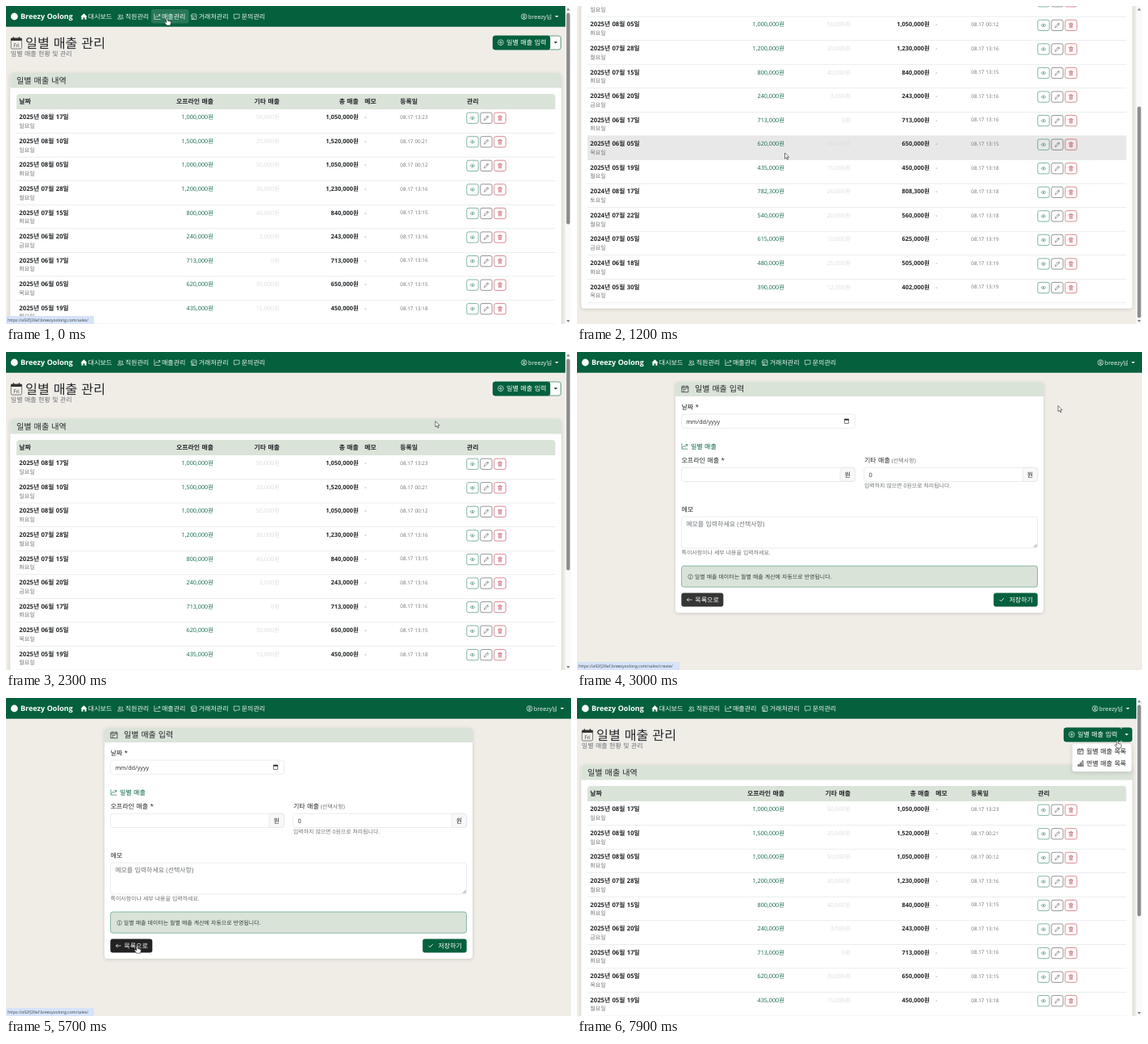
Write an HTML page that moves like this. It is 700x394 px and loops after 8 s.

```html
<!DOCTYPE html>
<html lang="ko">
<head>
<meta charset="utf-8">
<title>일별 매출 관리</title>
<style>
html, body { margin: 0; width: 100%; height: 100%; overflow: hidden; background: #f0ede7; }
svg { display: block; width: 700px; height: 394px; }
text {
  font-family: "Open Sans", "Noto Sans CJK KR", "Noto Sans CJK", sans-serif;
  word-spacing: .04em; white-space: pre; text-rendering: geometricPrecision;
}
.card { filter: drop-shadow(0 1px 2px rgba(0,0,0,.14)); }
</style>
</head>
<body>
<svg id="stage" viewBox="0 0 700 394" xmlns="http://www.w3.org/2000/svg"></svg>
<script>
const GREEN = '#04603d', SAGE = '#dae3d8', INK = '#25282b', GRAY = '#6f7377', LINE = '#dee1e3';
const LOOP = 8000, STEP = 100, MAX_SCROLL = 174;
const ROW_TOP = 128, ROW_H = 29.56;
const HOST = 'https://a92fj39af.breezyoolong.com/sales/';

// Markup helpers
const text = (s, x, y, size = 8, fill = INK, more = '') =>
  `<text x="${x}" y="${y}" font-size="${size}" fill="${fill}" ${more}>${s}</text>`;
const box = (x, y, w, h, fill, r = 0, more = '') =>
  `<rect x="${x}" y="${y}" width="${w}" height="${h}" rx="${r}" fill="${fill}" ${more}/>`;
const outline = (x, y, w, h, color, fill = '#fff', r = 3) =>
  box(x, y, w, h, fill, r, `stroke="${color}" stroke-width=".6"`);
const group = (id, body, more = '') => `<g id="${id}" ${more}>${body}</g>`;
const END = 'text-anchor="end"', BOLD = 'font-weight="700"', SEMI = 'font-weight="600"';

// Line icons on a 16 unit grid
const ICONS = {
  people: 'M5.5 8a2.5 2.5 0 1 0 0-5a2.5 2.5 0 0 0 0 5M1 13.5c0-5 9-5 9 0zM11 8a2.3 2.3 0 1 0-.5-4.500M11.500 9.700c2.500 0 3.500 2 3.500 3.800h-3',
  graph: 'M1 1v14h15M3 11l4-5 3 3 5-6M11 3h4v4',
  shop: 'M2 7v8h12v-8M1 6l2-4.500h10l2 4.500q-1.700 3-3.500 0q-1.700 3-3.500 0q-1.700 3-3.500 0q-1.800 3-3.500 0zM4 15v-4h4v4',
  chat: 'M1.500 2h13v10h-8l-3 3v-3h-2z',
  person: 'M8 15a7 7 0 1 0 0-14a7 7 0 0 0 0 14M8 9a2.500 2.500 0 1 0 0-5a2.500 2.500 0 0 0 0 5M3.500 13c1-3.500 8-3.500 9 0',
  plus: 'M8 15a7 7 0 1 0 0-14a7 7 0 0 0 0 14M8 4.500v7M4.500 8h7',
  info: 'M8 15a7 7 0 1 0 0-14a7 7 0 0 0 0 14M8 7v5M8 4v1.500',
  eye: 'M1 8q7-9 14 0q-7 9-14 0M8 10a2 2 0 1 0 0-4a2 2 0 0 0 0 4',
  pencil: 'M2 14l1-4 9-9 3 3-9 9zM10 3l3 3',
  trash: 'M2 3.500h12M6 3v-2h4v2M3.500 4l.5 11h8l.5-11M6.500 6.500v6M9.500 6.500v6',
  calendar: 'M1.500 2.500h13v12h-13zM1.500 5.500h13M4.500 1v2M11.500 1v2M4 9h2M7.500 9h2M4 12h2',
  bars: 'M1 15h14M2 15v-4h2.500v4M7 15v-8h2.500v8M12 15v-13h2.500v13',
  back: 'M15 8h-13M6.500 3.500l-4.500 4.500 4.500 4.500',
  check: 'M2 8.500l4 4 8-9'
};
const icon = (name, x, y, size, color, weight = 1.3) =>
  `<path d="${ICONS[name]}" transform="translate(${x} ${y}) scale(${size / 16})" fill="none" stroke="${color}" stroke-width="${weight}" stroke-linejoin="round" stroke-linecap="round"/>`;
const caret = (x, y, fill, id = '') =>
  `<path ${id && `id="${id}"`} d="M${x - 2.3} ${y - 1.100}h4.600l-2.300 2.400z" fill="${fill}"/>`;

function nav(width, shift) {
  const items = [['people', 138, '직원관리'], ['graph', 183.3, '매출관리'], ['shop', 229, '거래처관리'], ['chat', 282, '문의관리']];
  return box(0, 0, width, 25.7, GREEN) +
    '<circle cx="10.300" cy="13" r="4.400" fill="#fff"/>' +
    text('Breezy Oolong', 18, 16.4, 9, '#fff', BOLD) +
    '<path d="M92.500 13.200l4-4 4 4h-1v3.500h-2v-2.500h-2v2.500h-2v-3.500z" fill="#fff"/>' +
    text('대시보드', 101.8, 15.8, 8, '#f2f7f4') +
    items.map(([name, x, label]) => icon(name, x, 9.2, 7.8, '#f2f7f4') + text(label, x + 9.7, 15.8, 8, '#f2f7f4')).join('') +
    icon('person', 637.9 + shift, 9.200, 7.800, '#fff') +
    text('breezy님', 647 + shift, 15.8, 7.3, '#f2f7f4') + caret(682.3 + shift, 13, '#fff');
}

// date, offline amount, other amount, registered
const SALES = [
  ['2025-08-17', 1000000, 50000, '08.17 13:23'], ['2025-08-10', 1500000, 20000, '08.17 00:21'],
  ['2025-08-05', 1000000, 50000, '08.17 00:12'], ['2025-07-28', 1200000, 30000, '08.17 13:16'],
  ['2025-07-15', 800000, 40000, '08.17 13:15'], ['2025-06-20', 240000, 3000, '08.17 13:16'],
  ['2025-06-17', 713000, 0, '08.17 13:16'], ['2025-06-05', 620000, 30000, '08.17 13:15'],
  ['2025-05-19', 435000, 15000, '08.17 13:18'], ['2024-08-17', 782300, 26000, '08.17 13:18'],
  ['2024-07-22', 540000, 20000, '08.17 13:18'], ['2024-07-05', 615000, 10000, '08.17 13:19'],
  ['2024-06-18', 480000, 25000, '08.17 13:19'], ['2024-05-30', 390000, 12000, '08.17 13:19']
];
const won = n => String(n).replace(/\B(?=(\d{3})+$)/g, ',') + '원';

function saleRow([date, offline, other, stamp], i) {
  const top = ROW_TOP + i * ROW_H, y = top + 12.3;
  const [year, month, day] = date.split('-');
  const weekday = '일월화수목금토'[new Date(Date.UTC(year, month - 1, day)).getUTCDay()];
  const tools = [['eye', 570.8, '#2e8562'], ['pencil', 587.8, '#4a4d50'], ['trash', 604.8, '#c23a4a']];
  return text(`${year}년 ${month}월 ${day}일`, 16.3, y, 7.75, INK, BOLD) +
    text(weekday + '요일', 16.3, top + 23, 7, GRAY) +
    text(won(offline), 257, y, 7.3, '#14694a', END) +
    text(won(other), 339, y, 7.3, '#dcdddc', END) +
    text(won(offline + other), 436.8, y, 7.4, INK, BOLD + ' ' + END) +
    text('-', 444.3, y, 7.3, GRAY) +
    text(stamp, 488.3, y - .2, 6.35, GRAY) +
    tools.map(([name, x, color]) => outline(x, top + 4.1, 14.4, 13.3, color, 'none', 2.2) +
      icon(name, x + 3.9, top + 7.5, 6.6, color)).join('') +
    box(13, top + ROW_H - .3, 667.5, .6, LINE);
}

function listPage() {
  const heads = [['날짜', 16.3], ['오프라인 매출', 257, END], ['기타 매출', 339, END], ['총 매출', 436.8, END],
    ['메모', 444.3], ['등록일', 488.3], ['관리', 571]];
  const bottom = ROW_TOP + SALES.length * ROW_H + 7;
  return nav(693, 0) +
    box(180, 4, 46.500, 17.500, '#fff', 3, 'id="navHover" opacity=".14"') +
    outline(6.2, 40, 13.300, 13, '#333', 'none', 1.500) + box(6, 39.800, 13.700, 3.200, '#333', 1) +
    box(8.700, 38.300, 1.300, 3, '#333') + box(15.700, 38.300, 1.300, 3, '#333') +
    text('Fri', 12.9, 50.9, 6.3, '#333', 'text-anchor="middle"') +
    text('일별 매출 관리', 24, 51.6, 16.2, INK) +
    text('일별 매출 현황 및 관리', 5.8, 62.4, 8, GRAY) +
    outline(603.3, 37, 84.200, 17, GREEN) +
    box(603, 36.7, 71.3, 17.600, GREEN, 3, 'id="addButton"') +
    box(674, 36.7, 13.800, 17.600, GREEN, 3, 'id="toggle"') +
    icon('plus', 609, 41.300, 7.800, '#fff') + text('일별 매출 입력', 620, 48.2, 8.1, '#fff') +
    caret(681, 45.300, INK, 'toggleCaret') +
    group('', box(5.3, 83, 682.7, bottom - 83, '#fff', 4) +
      `<path d="M5.300 101.500v-14.500a4 4 0 0 1 4-4h674.700a4 4 0 0 1 4 4v14.500z" fill="${SAGE}"/>`, 'class="card"') +
    text('일별 매출 내역', 13, 95.6, 10.1, INK) +
    `<path d="M13 128v-15a4 4 0 0 1 4-4h659.500a4 4 0 0 1 4 4v15z" fill="${SAGE}"/>` +
    heads.map(([s, x, more = '']) => text(s, x, 121, 7.9, INK, SEMI + ' ' + more)).join('') +
    box(13, 0, 667.5, ROW_H, '#000', 0, 'id="rowHover" opacity=".09"') +
    SALES.map(saleRow).join('') +
    group('menu', group('', outline(613.3, 56.300, 74, 35, '#d8d8d8'), 'class="card"') +
      icon('calendar', 620, 62.300, 7.800, INK) + text('월별 매출 목록', 631, 69, 8.1) +
      icon('bars', 620, 76.800, 7.800, INK) + text('연별 매출 목록', 631, 83.5, 8.1));
}

function scrollbar() {
  return box(693, 0, 7, 394, '#fafafa') +
    '<path d="M694.300 5.500l2.200-3 2.200 3zM694.300 389l2.200 3 2.200-3z" fill="#858585"/>' +
    box(694.3, 8.500, 4.400, 262, '#8b8b8b', 2.2, 'id="thumb"');
}

function formPage() {
  const amount = (x, value) => outline(x, 143.2, 215, 17.300, LINE) +
    outline(x + 196.500, 143.2, 18.500, 17.300, LINE, '#f7f8f7') +
    text('원', x + 202, 154.7, 8) + text(value, x + 5.7, 154.7, 7.4);
  return box(0, 0, 700, 394, '#f0ede7') + nav(700, 6.8) +
    group('', box(122, 37, 456, 286, '#fff', 4) +
      `<path d="M122 55v-14a4 4 0 0 1 4-4h448a4 4 0 0 1 4 4v14z" fill="${SAGE}"/>`, 'class="card"') +
    icon('calendar', 129.3, 41.200, 9.400, INK, 1.2) + text('일별 매출 입력', 146, 49.4, 10, INK) +
    text('날짜 *', 129.5, 70.7) +
    outline(129.5, 77, 215, 17.300, LINE) + text('mm/dd/yyyy', 135.2, 88.6, 7.2) +
    outline(331.400, 83.300, 5.200, 5.200, '#222', '#fff', .5) + box(331.200, 82.800, 5.600, 1.800, '#222') +
    icon('graph', 129.5, 113.2, 7.4, GREEN) + text('일별 매출', 141, 119.9, 8, GREEN) +
    text('오프라인 매출 *', 129.5, 136.7) + amount(129.5, '') +
    text('기타 매출', 356, 136.7) + text('(선택사항)', 389.8, 136.5, 7, GRAY) + amount(355.7, '0') +
    text('입력하지 않으면 0원으로 처리됩니다.', 356, 168.4, 6.9, GRAY) +
    text('메모', 129.5, 197.6) +
    outline(129.5, 204.200, 441, 38.800, LINE) + text('메모를 입력하세요 (선택사항)', 135.2, 215.5, 7.95, GRAY) +
    '<path d="M565.800 242l4-4M568 242l1.800-1.800" stroke="#555" stroke-width=".6"/>' +
    text('특이사항이나 세부 내용을 입력하세요.', 129.5, 251.2, 6.95, GRAY) +
    outline(129.5, 265, 441, 26.200, '#4a9674', SAGE) +
    icon('info', 137.2, 275.200, 6.600, '#30453b') +
    text('일별 매출 데이터는 월별 매출 계산에 자동으로 반영됩니다.', 145.8, 281, 6.95, '#34423b') +
    box(129.3, 298.5, 52, 17, '#353535', 3, 'id="backButton"') +
    icon('back', 135.500, 303.500, 7, '#fff', 1.600) + text('목록으로', 146.3, 309.9, 8, '#fff') +
    box(516.2, 298.5, 54.500, 17, GREEN, 3) +
    icon('check', 523, 303.800, 6.400, '#fff', 2) + text('저장하기', 535.5, 309.9, 8, '#fff');
}

const POINTERS = {
  arrow: '<path d="M0 0v7.200l1.700-1.500 1.200 2.700 1.200-.5-1.200-2.600h2.300z" fill="#fff" stroke="#222" stroke-width=".6"/>',
  hand: '<path d="M-.8 .8q.9-1.500 1.700 0v3l3 .7q1.300.4 1 2l-.8 3h-4.600l-2.600-3.500q0-1.200 1.200-.7l1.100 1z" fill="#fff" stroke="#222" stroke-width=".6"/>',
  beam: '<path d="M-1.300-3.500h2.600M0-3.500v7M-1.300 3.500h2.600" fill="none" stroke="#444" stroke-width=".7"/>'
};

const stage = document.getElementById('stage');
stage.innerHTML = box(0, 0, 700, 394, '#f0ede7') +
  group('list', group('page', listPage()) + scrollbar()) +
  group('form', formPage()) +
  group('status', box(0, 384, 0, 10, '#d6e3f8', 1, 'id="statusBox"') + text('', 2, 391.100, 5.1, '#3b4047', 'id="url"')) +
  group('pointer', Object.entries(POINTERS).map(([id, d]) => group(id, d)).join(''));
const el = id => document.getElementById(id);

// Key tables: time followed by values
const PATH = [
  [0, 199.5, 14.5], [100, 201, 18], [300, 232, 105], [500, 255, 176], [600, 257.5, 182], [1900, 257.5, 182],
  [2200, 480, 105], [2500, 636, 47], [2800, 636, 48], [3000, 596, 66.500], [3400, 455, 128], [3800, 345, 150],
  [4100, 322, 96], [4400, 324, 63], [4700, 296, 120], [5100, 215, 240], [5400, 183, 296], [5500, 165, 306],
  [5800, 161, 307], [6000, 270, 272], [6200, 424.5, 225], [6400, 480, 190], [6700, 610, 96],
  [7000, 681, 46], [7500, 681, 47], [7900, 669.5, 52.5]
];
const SCROLL = [[0, 0], [500, 0], [700, 32.7], [900, 130], [1100, MAX_SCROLL], [1250, MAX_SCROLL], [1450, 62], [1600, 9], [1700, 0]];
const STATUS = [[0, 1], [200, 1], [500, 0], [2400, 0], [2500, 1], [3000, 1], [3300, 0], [5400, 0], [5500, 1], [6000, 1], [6200, .5], [6400, 0]];

function at(keys, t) {
  const i = keys.findIndex(k => k[0] > t);
  if (i < 0) return keys[keys.length - 1].slice(1);
  const a = keys[i - 1], b = keys[i], p = (t - a[0]) / (b[0] - a[0]);
  return a.slice(1).map((v, n) => v + (b[n + 1] - v) * p);
}
const show = (id, on) => el(id).setAttribute('display', on ? 'inline' : 'none');
const set = (id, name, value) => el(id).setAttribute(name, value);
const inside = (x, y, l, t, r, b) => x >= l && x <= r && y >= t && y <= b;

function render(t) {
  const [x, y] = at(PATH, t), [scroll] = at(SCROLL, t), [fade] = at(STATUS, t);
  const form = t >= 2800 && t < 5900;
  show('list', !form);
  show('form', form);
  set('page', 'transform', `translate(0 ${-scroll})`);
  set('thumb', 'y', 8.5 + scroll * .666);

  // Hover is only refreshed once scrolling comes to rest
  const rest = t >= 1150 && t < 1750 ? MAX_SCROLL : 0;
  const row = Math.floor((y + rest - ROW_TOP) / ROW_H);
  show('rowHover', !form && row >= 0 && x > 13 && x < 680);
  set('rowHover', 'y', ROW_TOP + row * ROW_H);

  const onNav = !form && inside(x, y, 180, 4, 226, 21.5);
  const onAdd = !form && inside(x, y, 603, 37, 674, 54);
  const onToggle = !form && inside(x, y, 674, 37, 688, 54);
  const onBack = form && inside(x, y, 129, 298, 181, 316);
  const open = t >= 7300;
  show('navHover', onNav);
  set('addButton', 'fill', onAdd && !open ? '#034f33' : GREEN);
  show('toggle', onToggle || open);
  set('toggleCaret', 'fill', onToggle || open ? '#fff' : INK);
  show('menu', open);
  set('backButton', 'fill', onBack ? '#222' : '#353535');

  const create = t >= 2400 && t < 4000;
  set('status', 'opacity', fade);
  set('statusBox', 'width', create ? 127 : 109);
  el('url').textContent = HOST + (create ? 'create/' : '');

  const kind = onNav || onAdd || onToggle || onBack ? 'hand' : t >= 6200 && t < 6300 ? 'beam' : 'arrow';
  Object.keys(POINTERS).forEach(id => show(id, id === kind));
  set('pointer', 'transform', `translate(${x} ${y})`);
}

const start = performance.now();
function tick() {
  const t = (performance.now() - start) % LOOP;
  render(Math.floor(t / STEP) * STEP);
  requestAnimationFrame(tick);
}
render(0);
requestAnimationFrame(tick);
</script>
</body>
</html>
```
